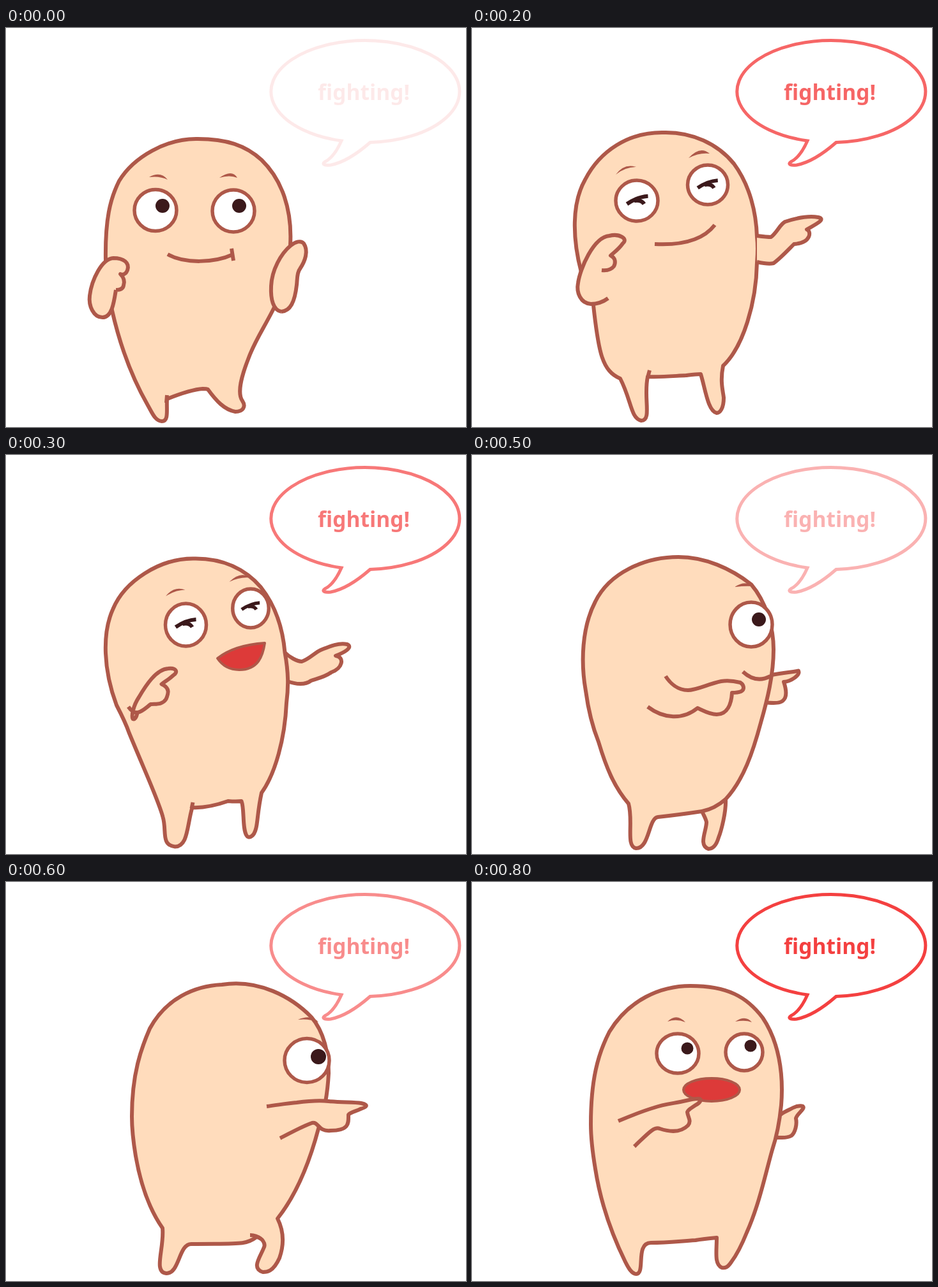
These frames come from a looping animation (720 by 626 pixels, 900 ms). An HTML page:

```html
<!DOCTYPE html>
<html lang="en">
<head>
<meta charset="utf-8">
<title>Fighting!</title>
<style>
  html, body { margin: 0; width: 100%; height: 100%; overflow: hidden; background: #fff; }
  svg { display: block; width: 100%; height: 100%; }
  .skin { fill: #ffdcbc; stroke: #ae5849; stroke-width: 6; stroke-linejoin: round; }
  .line { fill: none; stroke: #ae5849; stroke-width: 6; stroke-linejoin: round; }
  .brow { fill: #ae5849; }
  .eye { fill: #fff; stroke: #ae5849; stroke-width: 5.5; }
  .pupil { fill: #3b191b; }
  .squint { fill: none; stroke: #3b191b; stroke-width: 6; }
  .lips { fill: #dd3a39; stroke: #ae5849; stroke-width: 4; stroke-linejoin: round; }
  .bubble { fill: none; stroke: #f44040; stroke-width: 5; }
  text { fill: #f44040; font: bold 33.5px "Noto Sans", "Open Sans", sans-serif; text-anchor: middle; }
</style>
</head>
<body>
<svg viewBox="0 0 720 626">
  <g id="figure"></g>
  <g id="speech">
    <path class="bubble" d="M570 179.500A147.500 80 0 1 0 525 177C518 193 509 205 499 210C493 214 500 216 508 215C530 211 550 197 570 179.500Z"/>
    <text x="560" y="113">fighting!</text>
  </g>
</svg>
<script>
const STEP = 100;
const figure = document.getElementById('figure');
const speech = document.getElementById('speech');

// eyes: cx cy rx ry, pupil x y radius (radius 0 = squint); right side first
const poses = [
  {
    body: 'M300 174C345 174 375 184 400 207C432 238 448 285 445 340C443 385 437 407 419 440C403 472 390 490 380 517C369 545 361 572 370 585C376 594 371 602 359 602C342 599 329 585 316 567C314 566 311 566 308 566C292 567 272 574 252 582C251 600 255 617 244 617C233 616 229 604 222 592C198 550 180 505 166 443C159 415 156 390 156 365C155 300 163 268 177 240C200 202 252 173 300 174Z',
    left: 'M172 411C169 430 166 454 151 454C137 454 129 436 131 420C134 395 150 362 168 361C184 361 194 368 190 380C187 388 182 387 179 386C185 392 186 398 184 404C183 410 178 411 172 411C172 411 172 411 172 411',
    right: 'M431 445C418 443 414 425 415 405C416 380 430 354 446 341C453 335 462 333 466 338C474 350 468 366 460 378C455 384 456 396 455 403C452 430 445 444 431 445C431 445 431 445 431 445',
    eyes: [[356, 287, 33, 33, 365, 279, 11], [234, 286, 33, 32.5, 245, 279, 11]],
    brows: ['M334 235Q354 221 362 235Q350 230 334 235', 'M224 234Q242 224 253 238Q241 232 224 234'],
    mouth: 'M253 355C280 370 325 369 356 355',
    detail: 'M252 576L251 588M353 346L356 365'
  },
  {
    body: 'M300 164C345 163 385 182 410 213C435 247 445 290 446 328C448 345 447 355 446 368C445 430 425 500 393 530C388 555 393 570 394 580C394 597 388 604 383 604C369 601 365 565 358 543C350 543 343 544 335 545C315 546 295 548 275 547C268 580 282 616 265 616C248 612 250 585 232 550C204 538 198 510 190 435C188 415 180 400 171 383C157 330 156 275 177 238C200 193 245 163 300 164Z',
    left: 'M213 424C205 430 196 433 186 433C170 432 163 415 166 400C169 378 190 328 215 326C231 322 245 331 236 338C229 348 222 352 217 357C225 361 225 368 222 374C218 379 212 381 203 380C203 380 203 380 203 380',
    right: 'M446 326C454 327 462 328 468 328C478 320 482 308 490 304C508 298 525 294 542 297C555 300 538 308 524 316C531 318 532 337 504 339C494 349 482 362 472 369C464 371 455 369 446 367',
    eyes: [[369, 246, 31.5, 31, 369, 246, 0], [258, 271, 33, 32, 259, 271, 0]],
    brows: ['M339 204Q357 184 372 197Q356 195 339 204', 'M225 230Q238 212 257 218Q240 218 225 230'],
    mouth: 'M286 339C325 341 360 335 380 309',
    detail: 'M278 537L275 548'
  },
  {
    behind: true,
    body: 'M290 161C335 161 365 177 388 202C412 230 422 260 427 292C437 340 437 375 432 410C428 460 418 500 407 530C400 560 395 580 389 590C382 604 370 600 370 590C370 570 382 545 379 543C372 545 365 543 360 541C343 553 325 560 308 559C298 585 288 612 264 613C236 612 254 594 259 586C275 550 240 490 195 436C186 424 180 412 175 402C148 345 144 285 158 245C170 205 235 160 290 161Z',
    left: 'M198 386C203 394 207 398 211 395C222 388 235 372 250 360C268 346 280 344 293 344C303 345 294 351 288 353C281 356 274 360 270 362C290 370 283 382 279 392C271 406 256 399 250 402C226 420 205 446 180 410',
    right: 'M425 292C434 308 448 319 458 320C472 320 485 312 495 308C508 301 517 295 526 297C533 304 520 312 508 314C530 316 522 333 514 343C504 348 490 340 483 339C470 353 450 350 432 342',
    eyes: [[397, 235, 25, 30, 397, 230, 0], [305, 262, 31, 35, 304, 259, 0]],
    brows: ['M360 194Q378 179 391 188Q376 187 360 194', 'M275 213Q288 198 304 205Q290 206 275 213'],
    mouth: 'M331 319C350 304 375 297 405 295C402 315 395 337 365 337C348 337 337 328 331 319Z',
    detail: 'M307 553L306 561'
  },
  {
    behind: true,
    body: 'M323 160C365 160 405 178 437 203C460 230 472 270 472 305C472 345 462 385 452 420C440 465 425 510 397 540C398 560 390 590 386 600C382 614 376 618 370 618C354 612 367 590 367 576C366 570 362 564 360 559C340 562 310 566 291 568C276 570 278 617 257 617C240 615 253 575 245 547C222 520 210 490 198 450C188 425 182 400 178 370C170 325 172 270 193 230C215 185 270 160 323 160Z',
    left: 'M303 347C310 358 322 369 338 369C352 369 370 359 390 355C402 353 412 355 420 357C426 361 427 368 421 371C416 373 412 373 407 373C406 390 400 407 383 407C372 407 362 401 353 397C330 416 300 414 275 395',
    right: 'M463 346C468 345 470 345 475 344C487 342 495 341 503 340C510 339 511 338 511 339C514 345 500 355 488 356C491 365 493 374 490 381C486 389 478 389 472 389C468 389 464 389 460 388',
    eyes: [[437, 266, 33, 35, 449, 258, 11]],
    brows: ['M411 207Q428 196 440 206Q428 205 411 207'],
    mouth: 'M424 340C438 353 452 355 467 347',
    detail: 'M397 540Q380 555 360 559'
  },
  {
    behind: true,
    body: 'M338 161C395 152 447 180 478 212C498 235 505 270 505 300C503 340 495 370 489 387C475 440 455 490 425 528C436 550 435 570 428 590C418 612 408 612 402 612C384 606 397 590 403 575C408 567 400 558 392 557C375 570 365 567 290 568C270 568 272 614 251 614C230 612 248 575 245 543C222 510 210 470 203 430C198 400 197 385 197 368C197 300 212 260 225 230C250 183 295 163 338 161Z',
    left: 'M408 352C425 350 440 347 455 346C470 344 488 342 505 344C525 346 545 345 556 347C570 350 562 354 555 356C547 360 540 361 536 365C536 378 538 390 508 390C488 392 490 376 479 378C462 384 445 394 429 402',
    eyes: [[471, 280, 35, 34.5, 489, 274, 12]],
    brows: ['M457 216Q478 207 489 220Q474 214 457 216'],
    detail: 'M382 554Q392 554 399 560'
  },
  {
    behind: true,
    body: 'M342 163C400 163 430 180 455 213C480 250 488 300 484 350C481 380 475 405 470 420C460 455 450 505 430 550C420 575 412 588 406 596C400 605 396 606 391 605C379 600 383 580 383 558C372 559 360 560 350 562C320 564 305 566 280 566C255 566 272 615 257 615C250 615 245 606 240 596C215 545 200 495 193 450C188 420 186 400 186 380C186 310 197 270 215 235C245 185 295 163 342 163Z',
    left: 'M229 375C248 367 265 360 285 354C302 348 320 347 335 343C343 341 350 340 354 340C362 340 356 347 350 350C343 355 338 357 337 361C338 370 344 374 338 382C325 395 306 391 294 387C285 383 275 395 254 415',
    right: 'M474 372C482 366 486 362 491 360C497 357 502 354 508 352C513 351 516 351 518 352C522 356 508 364 507 371C509 380 506 393 500 398C493 402 486 401 481 401C476 401 472 400 470 399',
    eyes: [[426, 267, 29, 29, 436, 257, 9.5], [322, 269, 33, 31, 337, 261, 9.5]],
    brows: ['M412 219Q428 208 438 220Q428 216 412 219', 'M306 219Q320 205 334 220Q320 214 306 219'],
    mouth: 'M331 326A44 18 0 1 1 419 326A44 18 0 1 1 331 326Z'
  }
];

const NUM = /[\d.]+/g;
const shape = d => d.replace(NUM, '').replace(/ /g, '');
const mid = (a, b) => (a + b) / 2;

// Halfway path; falls back to the later one when the outlines differ.
function mixPath(a, b) {
  if (!a || !b || shape(a) !== shape(b)) return b;
  const from = a.match(NUM);
  let i = 0;
  return b.replace(NUM, n => mid(+from[i++], +n));
}

function mixEye(a, b) {
  if (!a) return b;
  const eye = b.map((n, i) => mid(a[i], n));
  if (!b[6]) eye[6] = 0;
  return eye;
}

function between(a, b) {
  const pose = { behind: b.behind, detail: b.detail && mixPath(a.detail, b.detail) };
  for (const key of ['body', 'left', 'right', 'mouth']) pose[key] = mixPath(a[key], b[key]);
  pose.eyes = b.eyes.map((eye, i) => mixEye(a.eyes[i], eye));
  pose.brows = b.brows.map((brow, i) => mixPath(a.brows[i], brow));
  return pose;
}

const path = (cls, d, extra = '') => d ? `<path class="${cls}" d="${d}" ${extra}/>` : '';

function drawEye([cx, cy, rx, ry, px, py, r]) {
  const ball = `<ellipse class="eye" cx="${cx}" cy="${cy}" rx="${rx}" ry="${ry}"/>`;
  if (r) return ball + `<circle class="pupil" cx="${px}" cy="${py}" r="${r}"/>`;
  return ball + path('squint', 'M-16 5Q0 -6 16 -7M-5 0Q6 -2 10 5',
    `transform="translate(${px} ${py}) scale(${rx / 32})"`);
}

function drawPose(p) {
  const arm = path('skin', p.right);
  const open = p.mouth && p.mouth.endsWith('Z');
  return (p.behind ? arm : '') + path('skin', p.body) + path('line', p.detail) +
    (p.behind ? '' : arm) +
    p.eyes.map(drawEye).join('') +
    p.brows.map(d => path('brow', d)).join('') +
    path(open ? 'lips' : 'line', p.mouth) +
    path('skin', p.left);
}

const [up, wink, laugh, turn, point, gasp] = poses;
const steps = [
  [up, 0.11], [between(up, wink), 0.45], [wink, 0.8],
  [between(wink, laugh), 0.7], [laugh, 0.6], [turn, 0.4],
  [point, 0.6], [between(point, gasp), 0.8], [gasp, 1]
].map(([pose, alpha]) => ({ art: drawPose(pose), alpha }));

const start = performance.now();
let shown = -1;

function render() {
  const i = Math.floor((performance.now() - start) / STEP) % steps.length;
  if (i !== shown) {
    shown = i;
    figure.innerHTML = steps[i].art;
    speech.setAttribute('opacity', steps[i].alpha);
  }
  requestAnimationFrame(render);
}
render();
</script>
</body>
</html>
```
